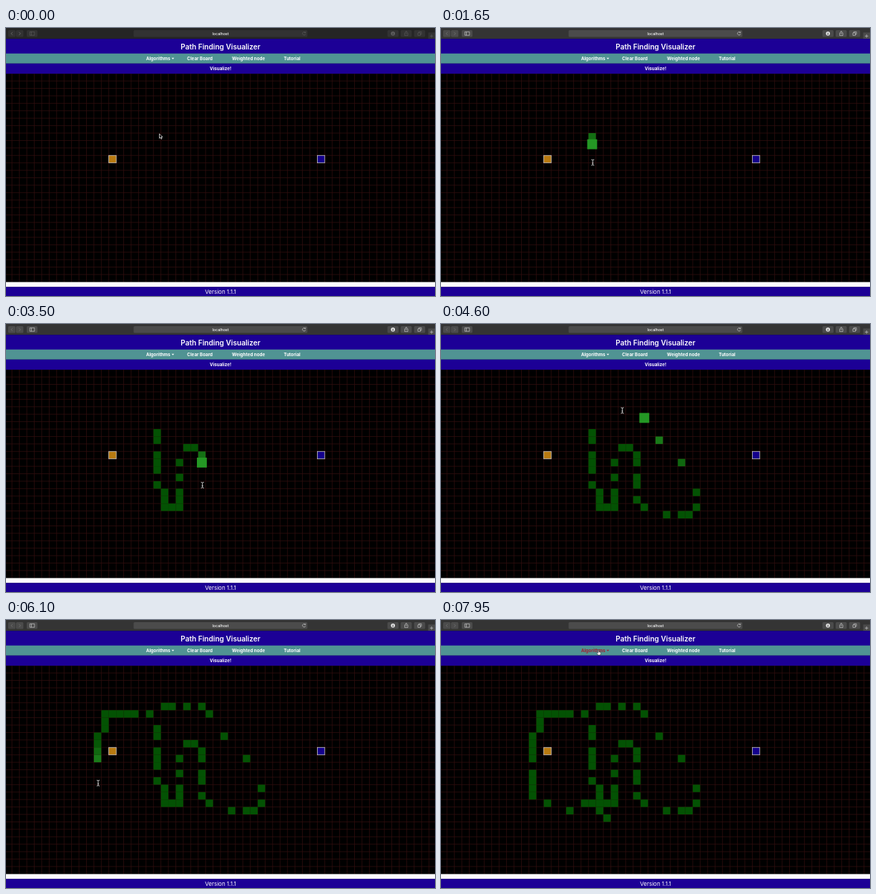
An HTML page for the animation above (8000 ms loop, 600 by 375 pixels).

```html
<!DOCTYPE html>
<html lang="en">
<head>
<meta charset="utf-8">
<title>Path Finding Visualizer</title>
<style>
  html, body { margin: 0; width: 100%; height: 100%; overflow: hidden; background: #000; }
  svg { display: block; width: 100vw; height: 100vh; }
  text { font-family: Inter, "Open Sans", sans-serif; fill: #fff; }
  .mid { text-anchor: middle; }
  .nav { font-size: 6.25px; font-weight: 700; }
  .bar { fill: #1c0096; }
  .line { fill: none; stroke: #c8c8c8; stroke-width: .7; }
  #chrome { --btn: #4b4b4b; }
  #chrome.idle { --btn: #323232; }
  #chrome .btn { fill: var(--btn); }
  #chrome .bg { fill: #343434; }
  #chrome.idle .bg { fill: #252525; }
  #chrome.idle .icon { opacity: .25; }
  #menu.hover text { fill: #a3202c; }
  #menu.hover path { fill: #a3202c; }
  #menu path { fill: #fff; }
</style>
</head>
<body>
<svg viewBox="0 0 600 375" preserveAspectRatio="none">
  <rect width="600" height="375"/>
  <path id="grid" fill="none" stroke="#300e0e" stroke-width=".8"/>

  <g id="chrome">
    <rect class="bg" width="600" height="15.2"/>
    <g class="btn">
      <rect x="3" y="3" width="10.3" height="9.4" rx="1.5"/>
      <rect x="14" y="3" width="10.3" height="9.4" rx="1.5"/>
      <rect x="29" y="3" width="15" height="9.4" rx="1.5"/>
      <rect x="178.5" y="3" width="243" height="9.4" rx="1.5"/>
      <rect x="533.5" y="3" width="15.5" height="9.4" rx="1.5"/>
      <rect x="552" y="3" width="15.5" height="9.4" rx="1.5"/>
      <rect x="570.7" y="3" width="15.5" height="9.4" rx="1.5"/>
      <rect x="590.5" y="6.3" width="9.5" height="9"/>
    </g>
    <path class="line" style="stroke:#777" d="M9.2 5.8 7.2 7.8 9.2 9.8M18.3 5.8 20.3 7.8 18.3 9.8"/>
    <g class="icon">
      <path class="line" d="M33.3 5.4h6.6v4.8h-6.6zM35.5 5.4v4.8"/>
      <path class="line" d="M418.6 6.3A2.2 2.2 0 1 0 419 8.3M418.9 4.8v1.8h-1.8"/>
      <circle cx="541.2" cy="7.8" r="2.8" fill="#eee"/>
      <path d="M541.2 6v3.2M540 8.1l1.2 1.2 1.2-1.2" fill="none" stroke="#333" stroke-width=".7"/>
      <path class="line" d="M558.6 6.8h-1v3.8h4.4V6.8h-1M559.8 8.8V4.5M558.5 5.7l1.3-1.3 1.3 1.3"/>
      <path class="line" d="M576 6.8h3.5v3.5H576zM577.4 6.8V5.3h3.6v3.6h-1.5"/>
      <path class="line" d="M595.2 9v4.6M592.9 11.3h4.6"/>
    </g>
    <text class="mid" x="300" y="9.8" font-size="5.3" font-weight="500">localhost</text>
  </g>

  <rect class="bar" y="15.2" width="600" height="20.8"/>
  <text class="mid" x="300" y="29.6" font-size="10.1" font-weight="600">Path Finding Visualizer</text>
  <rect y="35.7" width="600" height="14.1" fill="#509393"/>
  <g class="nav">
    <g id="menu">
      <text x="196" y="45.1">Algorithms</text>
      <path d="M231.6 41.8h3.6l-1.8 1.9z"/>
    </g>
    <text x="253.3" y="45.1">Clear Board</text>
    <text x="316" y="45.1">Weighted node</text>
    <text x="388.5" y="45.1">Tutorial</text>
  </g>
  <rect class="bar" y="49.7" width="600" height="14.2"/>
  <text class="nav mid" x="300" y="59.2">Visualize!</text>

  <rect y="355.5" width="600" height="7" fill="#fff"/>
  <rect class="bar" y="362.3" width="600" height="12.7"/>
  <text class="mid" x="300" y="371.9" font-size="8">Version 1.1.1</text>

  <g stroke="#c9c9c9" stroke-width=".8">
    <rect id="start" fill="#b87a10"/>
    <rect id="goal" fill="#14008c"/>
  </g>
  <g id="walls"></g>

  <g id="cursor">
    <path id="arrow" d="M0 0v6.2l1.5-1.3 1 2.3 1.1-.5-1-2.2h2z" fill="#000" stroke="#fff" stroke-width=".7"/>
    <g id="beam" fill="none">
      <path d="M-2-4Q0-4 0-3Q0-4 2-4M0-3V3M-2 4Q0 4 0 3Q0 4 2 4M-1 1H1" stroke="#ddd" stroke-width=".9"/>
    </g>
    <path id="hand" d="M-.6 0q.7-.6 1.2.1v2.3l2 .5q.9.3.7 1.4l-.7 2.4H-.7L-2.5 4q-.2-1 .8-.7l1.1.8z" fill="#fff" stroke="#111" stroke-width=".5"/>
  </g>
</svg>
<script>
const LOOP = 8000, PITCH = 10.417, LEFT = 8.3, TOP = 63.7, LAG = 120;
const $ = id => document.getElementById(id);
const cellX = col => LEFT + col * PITCH;
const cellY = row => TOP + row * PITCH;
const DIRS = { R: [1, 0], L: [-1, 0], D: [0, 1], U: [0, -1] };

// Dragged strokes: column, row, time, then direction, count, interval
const strokes = [
  [19, 8, 1500, 'D', 2, 100], [19, 11, 1750, 'D', 3, 47], [19, 15, 2000],
  [20, 16, 2120, 'D', 3, 90], [21, 18, 2420, 'R', 2, 120], [22, 17, 2640, 'U', 2, 80],
  [22, 14, 2850], [22, 12, 2960], [23, 10, 3080, 'R', 2, 120],
  [25, 11, 3360, 'D', 2, 100], [25, 14, 3560, 'D', 2, 60], [25, 17, 3700],
  [26, 18, 3780], [29, 19, 3900], [31, 19, 3990, 'R', 2, 80],
  [33, 18, 4180], [33, 16, 4280], [31, 12, 4410], [28, 9, 4500], [26, 6, 4570],
  [25, 5, 4650], [23, 5, 4720], [21, 5, 4790, 'L', 2, 60], [18, 6, 4930],
  [16, 6, 5050, 'L', 5, 90], [12, 7, 5580, 'D', 2, 70], [11, 9, 5740, 'D', 4, 90],
  [11, 14, 6150, 'D', 4, 55], [13, 18, 6430], [16, 19, 6560],
  [18, 18, 6660, 'R', 2, 80], [20, 19, 6830], [21, 20, 6920]
];

function place(rect, col, row, scale = 1) {
  const size = PITCH * scale, shift = (PITCH - size) / 2;
  rect.setAttribute('x', cellX(col) + shift);
  rect.setAttribute('y', cellY(row) + shift);
  rect.setAttribute('width', size);
  rect.setAttribute('height', size);
}

const walls = strokes.flatMap(([col, row, time, dir = 'R', count = 1, gap = 0]) =>
  Array.from({ length: count }, (_, i) => {
    const rect = document.createElementNS('http://www.w3.org/2000/svg', 'rect');
    $('walls').append(rect);
    return { rect, col: col + DIRS[dir][0] * i, row: row + DIRS[dir][1] * i, time: time + gap * i };
  }));

// The pointer runs slightly ahead of the walls it draws
const path = [
  [0, 214.5, 148], [400, 212, 190], [900, 212, 152],
  ...walls.map(w => [w.time - LAG, cellX(w.col + .5) + .8, cellY(w.row + .5)]),
  [7000, 235, 279], [7200, 233, 270], [7650, 216, 122], [7880, 220.3, 42.3], [LOOP, 220.3, 42.3]
];

function pointerAt(t) {
  const i = Math.max(1, path.findIndex(p => p[0] > t));
  const [t0, x0, y0] = path[i - 1], [t1, x1, y1] = path[i];
  const k = (t - t0) / (t1 - t0);
  return [x0 + (x1 - x0) * k, y0 + (y1 - y0) * k];
}

function drawWall({ rect, col, row, time }, t) {
  const age = t - time;
  rect.style.display = age < 0 ? 'none' : '';
  if (age < 0) return;
  const fade = Math.min(1, Math.max(0, (age - 85) / 215));
  const mix = (a, b) => Math.round(a + (b - a) * fade);
  place(rect, col, row, age < 85 ? 1.33 : 1);
  rect.setAttribute('fill', age < 85 ? '#249724' : `rgb(${mix(26, 3)},${mix(124, 82)},${mix(26, 3)})`);
}

function draw(now) {
  const t = now % LOOP;
  walls.forEach(w => drawWall(w, t));
  const shape = t >= 7850 ? 'hand' : t >= 1380 && t < 6960 ? 'beam' : 'arrow';
  for (const id of ['arrow', 'beam', 'hand']) $(id).style.display = id === shape ? '' : 'none';
  $('cursor').setAttribute('transform', `translate(${pointerAt(t)})`);
  $('menu').classList.toggle('hover', shape === 'hand');
  $('chrome').classList.toggle('idle', t < 600);
  requestAnimationFrame(draw);
}

let lines = '';
for (let c = 0; c < 58; c++) lines += `M${cellX(c)} ${TOP}V355.5`;
for (let r = 0; r < 28; r++) lines += `M0 ${cellY(r)}H600`;
$('grid').setAttribute('d', lines);
place($('start'), 13, 11);
place($('goal'), 41, 11);
requestAnimationFrame(draw);
</script>
</body>
</html>
```
